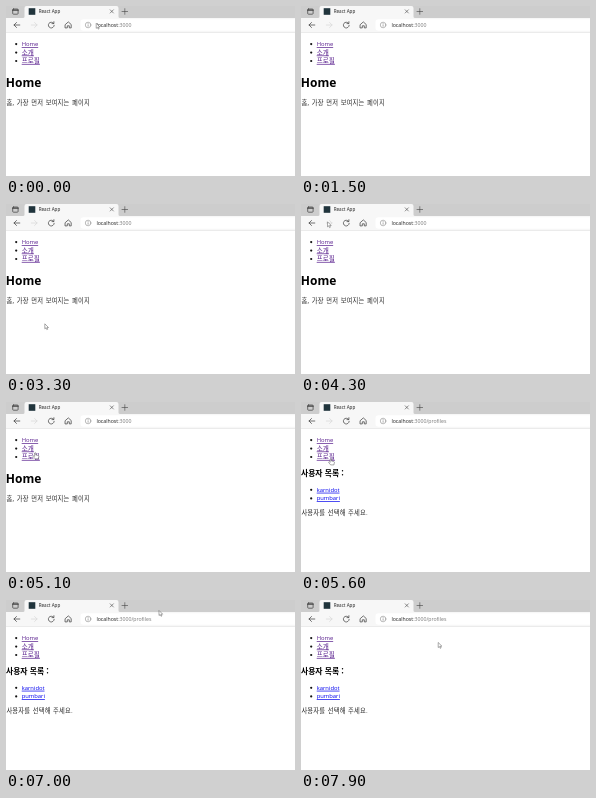
An HTML page that plays this animation: 289 px wide and 170 px high, repeating every 8 s.

```html
<!DOCTYPE html>
<html lang="ko">
<head>
<meta charset="utf-8">
<title>React App</title>
<style>
  html, body { margin: 0; width: 100%; height: 100%; overflow: hidden; background: #fff; }
  svg { display: block; width: 289px; height: 170px; }
  text { font-family: "Open Sans", "Noto Sans CJK KR", "Noto Sans CJK", sans-serif; fill: #1c1c1c; }
  .ko { font-family: "Noto Sans CJK KR", "Noto Sans CJK", sans-serif; }
  .body { font-size: 6.3px; letter-spacing: .16px; word-spacing: .6px; fill: #2a2a2a; }
  .title { font-weight: 700; fill: #000; }
  .icon { fill: none; stroke: #444; stroke-width: .75; stroke-linecap: round; stroke-linejoin: round; }
  .arrow, .hand { fill: #fff; stroke: #555; stroke-width: .5; stroke-linejoin: round; }
</style>
</head>
<body>
<svg viewBox="0 0 289 170" xmlns="http://www.w3.org/2000/svg">
  <rect width="289" height="170" fill="#fff"/>

  <!-- tab strip -->
  <rect width="289" height="12" fill="#cdcdcd"/>
  <path d="M17 12q1.5 0 1.5-1.5V2q0-2 2-2H110.500q2 0 2 2v8.500q0 1.500 1.500 1.500z" fill="#f7f7f7"/>
  <g class="icon">
    <rect x="6.700" y="3" width="5.400" height="5.200" rx=".8"/>
    <path d="M6.700 4.200h5.400" stroke-width="1.200"/>
    <path d="M104.200 3.800l3.200 3.200m0-3.200l-3.200 3.200" stroke-width=".6"/>
    <path d="M116 5.500h5.600m-2.800-2.800v5.600" stroke-width=".6"/>
  </g>
  <rect x="22.700" y="2.200" width="6.600" height="6.600" fill="#20343c"/>
  <text x="32.700" y="7.300" font-size="4.600">React App</text>

  <!-- toolbar -->
  <rect y="12" width="289" height="14.500" fill="#f7f7f7"/>
  <rect y="26.200" width="289" height=".6" fill="#e2e2e2"/>
  <rect x="74.500" y="13.300" width="230" height="11.400" rx="3" fill="#fff"/>
  <g class="icon">
    <path d="M13.800 19h-5.800m2.500-2.500l-2.500 2.500 2.500 2.500"/>
    <path d="M25.300 19h5.800m-2.500-2.500l2.500 2.500-2.500 2.500" stroke="#d8d8d8"/>
    <path d="M47.600 17.300a2.900 2.900 0 1 0 .6 2M47.900 15.700v1.900h-1.900"/>
    <path d="M59.400 18.500l2.900-2.600 2.900 2.600v3.400h-1.900v-2.100h-2v2.100h-1.900z"/>
    <circle cx="82.100" cy="19" r="2.800" stroke="#777" stroke-width=".5"/>
    <path d="M82.100 18.800v1.500m0-2.700v.05" stroke="#777" stroke-width=".6"/>
  </g>
  <text x="90.400" y="20.900" font-size="5.200">localhost<tspan fill="#777" style="fill:#777">:3000<tspan id="path"></tspan></tspan></text>

  <!-- page -->
  <g id="nav"></g>
  <g id="home">
    <text class="title" x="-.2" y="80.900" font-size="12">Home</text>
    <text class="ko body" x=".4" y="98.800">홈, 가장 먼저 보여지는 페이지</text>
  </g>
  <g id="profiles">
    <text class="ko title" x="0" y="73.700" font-size="7.800">사용자 목록 :</text>
    <g id="users"></g>
    <text class="ko body" x=".4" y="112.800">사용자를 선택해 주세요.</text>
  </g>

  <g id="cursor">
    <path class="arrow" d="M0 0v5l1.200-1 .8 1.800 .9-.4-.8-1.700h1.600z"/>
    <path class="hand" d="M-.6 .5q.6-.9 1.200 0v2l2.500 .6q.6 .2 .5 .9l-.5 2.400h-3.300l-2-2.500q.1-.9 1-.5l.6 .5z"/>
  </g>
</svg>

<script>
const LOOP = 8000, STEP = 100, PAGE_SWITCH = 5500;
const SVG = "http://www.w3.org/2000/svg";
const $ = s => document.querySelector(s);

function add(parent, tag, attrs) {
  const el = document.createElementNS(SVG, tag);
  for (const k in attrs) el.setAttribute(k, attrs[k]);
  return parent.appendChild(el);
}

function addLink(parent, label, y, color) {
  const korean = /[가-힣]/.test(label);
  add(parent, "circle", { cx: 10.2, cy: y - 2, r: 1.1, fill: "#111" });
  const text = add(parent, "text", {
    x: 15.7, y, "font-size": korean ? 6.6 : 5.82, class: korean ? "ko" : "", style: `fill:${color}`
  });
  text.textContent = label;
  add(parent, "rect", { x: 15.7, y: y + .9, width: text.getComputedTextLength(), height: .7, fill: color });
}

["Home", "소개", "프로필"].forEach((s, i) => addLink($("#nav"), s, 40.1 + i * 8.45, "#551a8b"));
["karnidot", "pumbari"].forEach((s, i) => addLink($("#users"), s, 89.8 + i * 8.6, "#0000ee"));

// Pointer moves: start, end, from, to
const moves = [
  [0, 800, [90.2, 17.3], [283, 6]],
  [1900, 2600, [264, 159], [38.8, 119.8]],
  [3600, 4200, [38.8, 119.8], [26.5, 17.8]],
  [4500, 5300, [26.5, 17.8], [29.8, 56.5]],
  [6100, 6900, [29.8, 56.5], [153, 10.5]],
  [7000, 7900, [153, 10.5], [137.2, 42.5]]
];
const ease = p => p * p * (3 - 2 * p);

function pointer(t) {
  if (t > 800 && t < 1900) return null;
  const [start, end, a, b] = moves.filter(m => m[0] <= t).pop();
  const p = ease(Math.min(1, (t - start) / (end - start)));
  return a.map((v, i) => v + (b[i] - v) * p);
}

const show = (el, on) => { el.style.display = on ? "" : "none"; };

function draw(now) {
  const t = Math.floor(now % LOOP / STEP) * STEP;
  const onProfiles = t >= PAGE_SWITCH;
  show($("#home"), !onProfiles);
  show($("#profiles"), onProfiles);
  $("#path").textContent = onProfiles ? "/profiles" : "";

  const pos = pointer(t);
  show($("#cursor"), pos);
  if (!pos) return;
  const [x, y] = pos;
  const overLink = x > 15 && x < 36 && y > 34 && y < 59;
  $("#cursor").setAttribute("transform", `translate(${x} ${y})`);
  show($(".arrow"), !overLink);
  show($(".hand"), overLink);
}

let origin;
function tick(now) {
  origin ??= now;
  draw(now - origin);
  requestAnimationFrame(tick);
}
draw(0);
requestAnimationFrame(tick);
</script>
</body>
</html>
```
